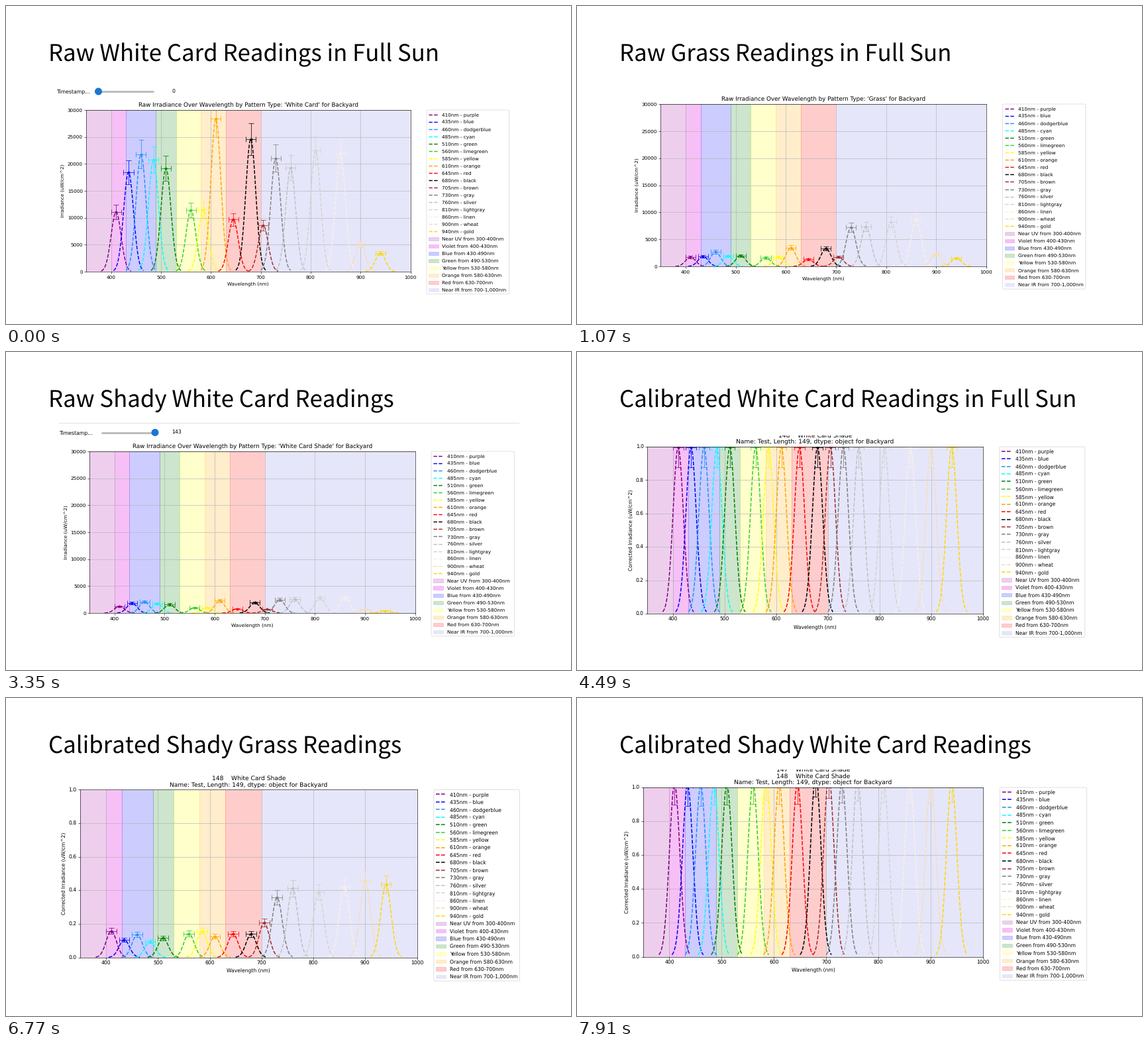
Write a matplotlib script that moves like this. It is 853 by 480 pixels and loops after 9.05 s.

```python
import numpy as np
import matplotlib.pyplot as plt
from matplotlib.animation import FuncAnimation
from matplotlib.patches import Circle, FancyBboxPatch, Rectangle
from matplotlib.transforms import Bbox

W, H, DPI = 853, 480, 64
LOOP, STEP = 9050, 25
FIRST, HOLD = 1070, 1140
PT = 72 / DPI                      # points per pixel

plt.rcParams["font.family"] = "DejaVu Sans"
plt.rcParams["text.hinting"] = "none"

CHANNELS = [
    (410, "purple"), (435, "blue"), (460, "dodgerblue"), (485, "cyan"),
    (510, "green"), (560, "limegreen"), (585, "yellow"), (610, "orange"),
    (645, "red"), (680, "black"), (705, "brown"), (730, "gray"),
    (760, "silver"), (810, "lightgray"), (860, "linen"), (900, "wheat"),
    (940, "gold"),
]
BANDS = [
    ("Near UV", 300, 400, "#a50fa5", 0.2), ("Violet", 400, 430, "violet", 0.5),
    ("Blue", 430, 490, "blue", 0.2), ("Green", 490, 530, "green", 0.2),
    ("Yellow", 530, 580, "yellow", 0.2), ("Orange", 580, 630, "orange", 0.2),
    ("Red", 630, 700, "red", 0.2), ("Near IR", 700, 1000, "lavender", 1),
]

SUN_CARD = np.array([11070, 18450, 21800, 20800, 19200, 11400, 11500, 28350, 9700,
                     24600, 8600, 21050, 19300, 22500, 22000, 5150, 3450])
SUN_GRASS = np.array([1700, 1840, 2700, 1900, 2000, 1600, 1700, 3450, 1300,
                      3300, 1750, 7200, 7350, 8250, 8800, 2250, 1500])
SHADE_CARD = np.array([1230, 1850, 2100, 1750, 1600, 980, 1000, 2280, 780,
                       1920, 700, 2500, 2580, 2830, 2800, 700, 430])
CAL_GRASS = np.array([.15, .10, .13, .09, .11, .135, .15, .12, .133,
                      .132, .197, .34, .393, .372, .40, .438, .416])
CAL_SHADE = np.array([1.02, 1.013, 1.013, 1.02, 1.02, 1.025, 1.05, 1.025, 1.025,
                      1.074, 1.065, 1.034, 1.047, 1.037, 1.04, 1.04, 1.037])


def raw_title(pattern):
    return [f"Raw Irradiance Over Wavelength by Pattern Type: '{pattern}' for Backyard"]


CAL_TITLE = ["Name: Test, Length: 149, dtype: object for Backyard",
             "148    White Card Shade", "147    White Card Shade"]

# heading, chart box (left, top, right, bottom), peaks, title lines, crop, slider
SLIDES = [
    ("Raw White Card Readings in Full Sun", (121, 157, 610.5, 401), SUN_CARD,
     raw_title("White Card"), 0, (77, 129, 139.5, 222, 0)),
    ("Raw Grass Readings in Full Sun", (126, 148, 618, 393), SUN_GRASS,
     raw_title("Grass"), 0, None),
    ("Raw Shady Grass Readings", (123, 151, 615, 395.5), SHADE_CARD * CAL_GRASS,
     raw_title("Grass Shade"), 0, (78, 122, 141, 222, 107)),
    ("Raw Shady White Card Readings", (126, 150, 617.5, 394), SHADE_CARD,
     raw_title("White Card Shade"), 0, (81, 121.5, 145, 225, 143)),
    ("Calibrated White Card Readings in Full Sun", (106, 143, 612.5, 395),
     np.full(17, .997), CAL_TITLE[:2], 126, None),
    ("Calibrated Grass Readings in Full Sun", (104, 127, 612.5, 380), CAL_GRASS,
     CAL_TITLE[:2], 0, None),
    ("Calibrated Shady Grass Readings", (112, 138.5, 620.5, 391.5), CAL_GRASS * 1.05,
     CAL_TITLE[:2], 0, None),
    ("Calibrated Shady White Card Readings", (100, 135, 613, 390.5), CAL_SHADE,
     CAL_TITLE, 108, None),
]
RULED = "Raw Shady White Card Readings"


def draw_legend(bg, x, top, u):
    names = [f"{nm}nm - {color}" for nm, color in CHANNELS]
    names += [f"{name} from {lo}-{hi:,}nm" for name, lo, hi, _, _ in BANDS]
    bg.add_patch(FancyBboxPatch((x, top), 170.6 * u, 380 * u, fc="white", ec="#cccccc",
                                lw=u * PT, alpha=0.8,
                                boxstyle=f"round,pad=0,rounding_size={2 * u}"))
    for i, name in enumerate(names):
        y = top + (8.9 + 15.1 * i) * u
        if i < len(CHANNELS):
            bg.plot([x + 4 * u, x + 24 * u], [y, y], "--", color=CHANNELS[i][1],
                    lw=2 * u * PT)
        else:
            color, alpha = BANDS[i - len(CHANNELS)][3:]
            bg.add_patch(Rectangle((x + 4 * u, y - 3.5 * u), 20 * u, 7 * u,
                                   color=color, alpha=alpha, lw=u * PT))
        bg.text(x + 32 * u, y + 3.6 * u, name, size=10 * u * PT)


def draw_slider(bg, x, y, lo, hi, value):
    bg.text(x - 0.5, y + 2.8, "Timestamp...", size=7.8 * PT)
    bg.plot([lo, hi], [y, y], color="#bdbdbd", lw=3 * PT, solid_capstyle="round")
    bg.add_patch(Circle((lo + (hi - lo) * value / 143, y), 5.5, color="#1976d2",
                        lw=0, zorder=3))
    bg.text(250.5, y + 2.8, str(value), size=7.8 * PT)


def draw_chart(fig, box, peaks, k):
    left, top, right, bottom = box
    ax = fig.add_axes([left / W, 1 - bottom / H, (right - left) / W, (bottom - top) / H])
    for _, lo, hi, color, alpha in BANDS:
        ax.axvspan(lo, hi, color=color, alpha=alpha, lw=k)
    for (nm, color), peak in zip(CHANNELS, peaks):
        x = np.linspace(nm - 30, nm + 30, 100)
        ax.plot(x, peak * np.exp(-((x - nm) / 10) ** 2 / 2), "--", color=color, lw=2 * k)
        ax.errorbar(nm, peak, xerr=10, yerr=0.12 * peak, fmt="*", color=color, ms=6 * k,
                    mew=k, elinewidth=k, capsize=5 * k, capthick=k)
    raw = peaks.max() > 2
    ax.set_xlim(350, 1000)
    ax.set_ylim(0, 30000 if raw else 1)
    ax.set_xticks(range(400, 1001, 100))
    ax.set_yticks(np.arange(0, 30001, 5000) if raw else np.arange(6) / 5)
    ax.grid(True, lw=0.8 * k)
    ax.tick_params(labelsize=10 * k, length=3.5 * k, pad=3.5 * k, width=0.8 * k)
    for spine in ax.spines.values():
        spine.set_linewidth(0.8 * k)
    label = "Irradiance (uW/cm^2)"
    ax.set_xlabel("Wavelength (nm)", size=10 * k, labelpad=4 * k)
    ax.set_ylabel(label if raw else "Corrected " + label, size=10 * k, labelpad=4 * k)


def render(fig, heading, box, peaks, lines, crop, slider):
    fig.clear()
    bg = fig.add_axes([0, 0, 1, 1])
    bg.set_xlim(0, W)
    bg.set_ylim(H, 0)
    bg.axis("off")
    left, top, right, _ = box
    u = (right - left) / 669.6     # pixels per chart point

    bg.text(64.5, 83, heading, family="Noto Sans CJK JP", size=34.8 * PT)
    if heading == RULED:
        bg.plot([80, 774], [107, 107], color="#e1e1e1", lw=PT)
    if slider:
        draw_slider(bg, *slider)
    for i, line in enumerate(lines):
        text = bg.text((left + right) / 2, top - (6 + 13 * i) * u, line, ha="center",
                       size=12 * u * PT, clip_on=True)
        text.set_clip_box(Bbox.from_extents(0, 0, W, H - crop))
    draw_legend(bg, right + 0.05 * (right - left), top, u)
    draw_chart(fig, box, peaks, u * PT)
    fig.canvas.draw()
    return np.array(fig.canvas.buffer_rgba())


fig = plt.figure(figsize=(W / DPI, H / DPI), dpi=DPI, facecolor="white")
pages = [render(fig, *slide) for slide in SLIDES]
fig.clear()
view = fig.figimage(pages[0])


def update(i):
    t = i * STEP + STEP - 1
    page = 0 if t < FIRST else 1 + (t - FIRST) // HOLD
    view.set_data(pages[min(page, len(pages) - 1)])
    return [view]


anim = FuncAnimation(fig, update, frames=LOOP // STEP, interval=STEP, repeat=True,
                     repeat_delay=0)
plt.show()
```
